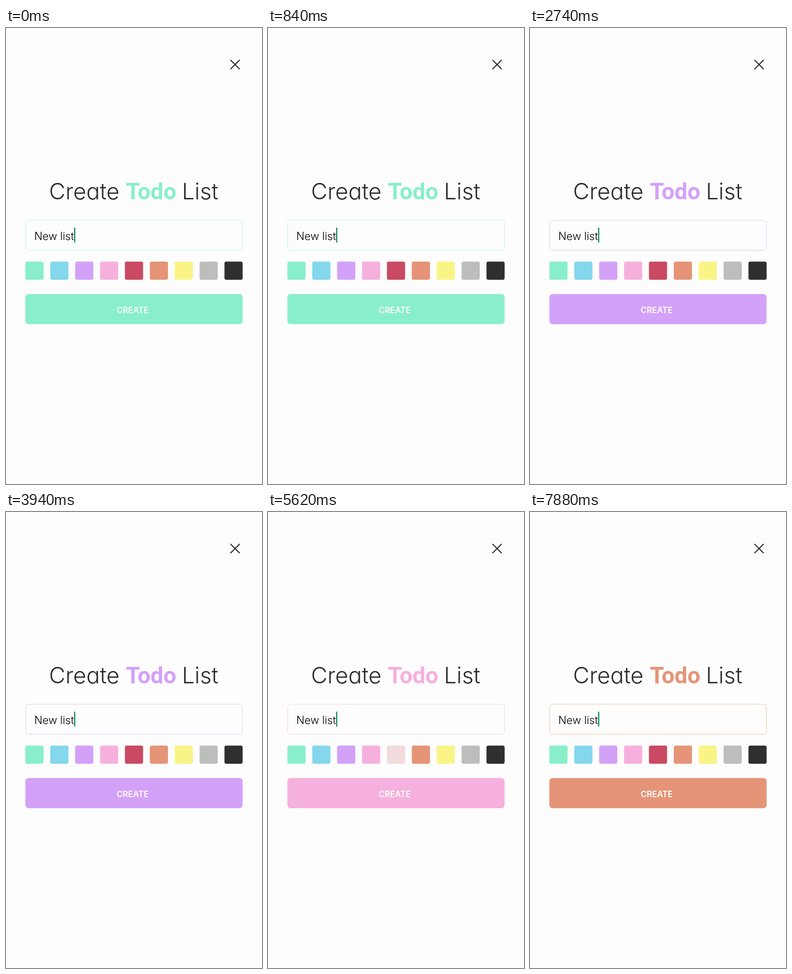
Write an HTML page that moves like this. It is 561 px wide and 998 px high and loops after 8 s.

```html
<!DOCTYPE html>
<html lang="en">
<head>
<meta charset="utf-8">
<title>Create Todo List</title>
<style>
  html, body { margin: 0; width: 100%; height: 100%; overflow: hidden; background: #fcfdfc; }
  svg { display: block; width: 100%; height: 100%; }
  text { font-family: Inter, Lato, sans-serif; font-feature-settings: "cv11"; }
  .title { font-size: 49.5px; font-weight: 300; fill: #2b2d2d; text-anchor: middle; }
  .strong { font-family: Roboto, "Noto Sans", sans-serif; font-size: 50px; font-weight: 700; fill: var(--accent); }
  .entry { font-size: 23.5px; font-weight: 300; fill: #000; }
  .label { font-size: 18px; font-weight: 600; fill: #fff; text-anchor: middle; }
</style>
</head>
<body>
<svg id="stage" viewBox="0 0 561 998" xmlns="http://www.w3.org/2000/svg">
  <rect width="561" height="998" fill="#fcfdfc"/>
  <path d="M492.5 70.5L511.5 89.5M511.5 70.5L492.5 89.5" stroke="#2b2d2d" stroke-width="2.4" stroke-linecap="round"/>
  <text class="title" x="171.5" y="375">Create</text>
  <text class="title strong" x="318" y="375">Todo</text>
  <text class="title" x="425.3" y="375">List</text>
  <rect x="43" y="420.7" width="475.2" height="65.8" rx="7" fill="none" stroke="var(--accent)" stroke-opacity=".6"/>
  <text class="entry" x="62" y="464">New list</text>
  <rect id="caret" x="149.2" y="437" width="2.6" height="32.5" fill="#148a68"/>
  <g id="swatches"></g>
  <rect x="42.5" y="582.2" width="476" height="66" rx="7" fill="var(--accent)"/>
  <text class="label" x="277.6" y="624">CREATE</text>
</svg>
<script>
const LOOP = 8000;
const COLORS = ["#89efca", "#84d7ec", "#d4a1f9", "#f6b0dd", "#c94a62",
                "#e59478", "#faf487", "#bcbebc", "#2f302e"];
// Each tap: swatch index, finger down, finger up (ms).
const TAPS = [[1, 840, 960], [2, 2320, 2440], [3, 4000, 4120], [4, 5520, 5720], [5, 6920, 7040]];
const DIM = 0.2, PRESS = 40, RELEASE = 250;
const BLINK = { start: 520, period: 1020, on: 520 };

const stage = document.getElementById("stage");
const caret = document.getElementById("caret");
const group = document.getElementById("swatches");

const swatches = COLORS.map((color, i) => {
  const el = document.createElementNS(stage.namespaceURI, "rect");
  const attrs = { x: 42.5 + i * 54.53, y: 511.2, width: 39.8, height: 39.8, rx: 4, fill: color };
  for (const key in attrs) el.setAttribute(key, attrs[key]);
  return group.appendChild(el);
});

const clamp = v => Math.min(1, Math.max(0, v));
const ease = v => v * v * (3 - 2 * v);

function tapOpacity(t, down, up) {
  const pressed = ease(clamp((t - down) / PRESS));
  const released = ease(clamp((t - up) / RELEASE));
  return 1 - (1 - DIM) * pressed * (1 - released);
}

function draw(t) {
  let selected = 0;
  for (const [index, down, up] of TAPS) {
    if (t >= up) selected = index;
    swatches[index].setAttribute("opacity", tapOpacity(t, down, up));
  }
  stage.style.setProperty("--accent", COLORS[selected]);

  const phase = (t - BLINK.start + BLINK.period) % BLINK.period;
  caret.setAttribute("visibility", phase < BLINK.on ? "visible" : "hidden");
}

const start = performance.now();
function tick() {
  draw((performance.now() - start) % LOOP);
  requestAnimationFrame(tick);
}
draw(0);
requestAnimationFrame(tick);
</script>
</body>
</html>
```
